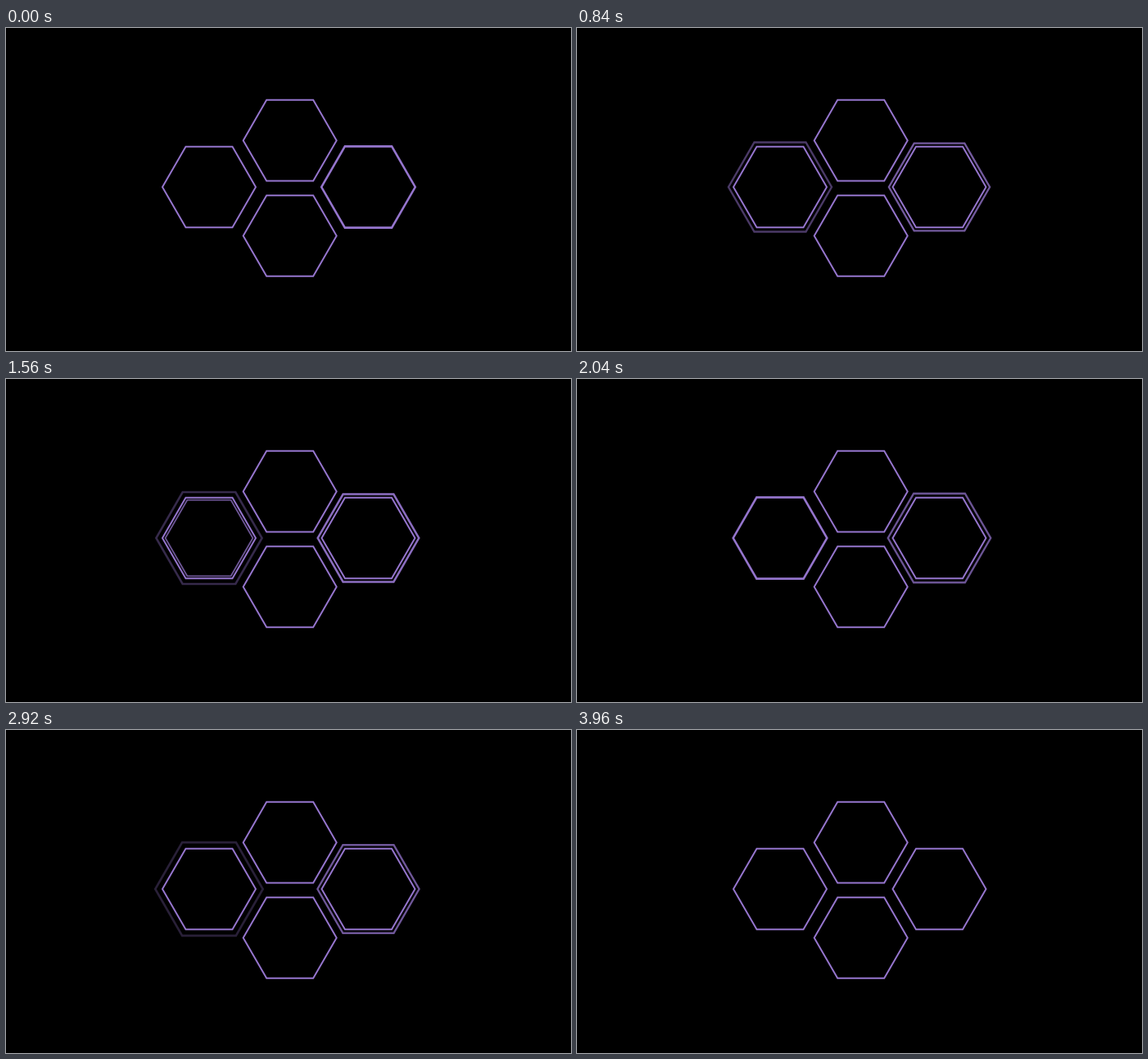
An HTML page with a canvas that plays this animation: 690x394 px, repeating every 4 s.

```html
<!DOCTYPE html>
<html lang="en">
<head>
<meta charset="utf-8">
<title>Hexagon pulses</title>
<style>
  html, body { margin: 0; width: 100%; height: 100%; overflow: hidden; background: #000; }
  canvas { display: block; }
</style>
</head>
<body>
<canvas id="stage" width="690" height="394"></canvas>
<script>
const ctx = document.getElementById('stage').getContext('2d');
const LOOP = 4000, STEP = 40, HOLD = 160, RADIUS = 57;
const LEFT = [248, 194], RIGHT = [442.5, 194], TOP = [346.7, 137.2], BOTTOM = [346.7, 253.5];

// Start times in ms
const sends = [240, 480, 730, 984, 1420, 1720, 2028, 2480, 2760, 3010, 3268];
const transfers = [913, 1240, 1500, 2130, 2316, 2700, 3000, 3560];
const swells = [-13, 320, 720, 972, 1430, 1840, 2392, 2780, 3080, 3500];
const taps = [480, 2480];

function hexagon([x, y], scale = 1, opacity = 1) {
  ctx.globalAlpha = opacity;
  ctx.lineWidth = 2 * scale * scale;
  ctx.beginPath();
  for (let i = 0; i < 6; i++) {
    const angle = i * Math.PI / 3;
    ctx.lineTo(x + RADIUS * scale * Math.cos(angle), y + RADIUS * scale * Math.sin(angle));
  }
  ctx.closePath();
  ctx.stroke();
}

// Calls draw with the progress of every event active at time t
function play(t, starts, duration, draw) {
  for (const start of starts) {
    const p = (t - start) / duration;
    if (p > 0 && p < 1) draw(p);
  }
}

const wave = p => Math.sin(Math.PI * p);

function pressable(t, center, start) {
  const p = (t - start) / 200;
  const dip = p > 0 && p < 1 ? wave(p) : 0;
  hexagon(center, 1 - 0.045 * dip, 1 - 0.55 * dip);
}

function render(t) {
  ctx.globalAlpha = 1;
  ctx.fillStyle = '#000';
  ctx.fillRect(0, 0, 690, 394);
  ctx.strokeStyle = '#9575cd';
  ctx.lineJoin = 'miter';

  const swell = p => hexagon(RIGHT, 1 + 0.1 * wave(p), 1 - 0.28 * wave(p));
  play(t, sends, 220, p => hexagon(LEFT, 1 + 0.21 * p, 1 - p));
  play(t, transfers, 220, p => {
    hexagon(LEFT, 1 - 0.23 * p, 1 - p);
    hexagon(RIGHT, 1 + 0.3 * p, 1 - p);
  });
  play(t, swells, 400, swell);
  play(t, taps, 240, swell);

  hexagon(LEFT);
  hexagon(RIGHT);
  pressable(t, TOP, 480);
  pressable(t, BOTTOM, 2475);
}

function tick() {
  const t = Math.floor(performance.now() % LOOP / STEP) * STEP;
  render(t < HOLD ? 0 : t);
  requestAnimationFrame(tick);
}
tick();
</script>
</body>
</html>
```
